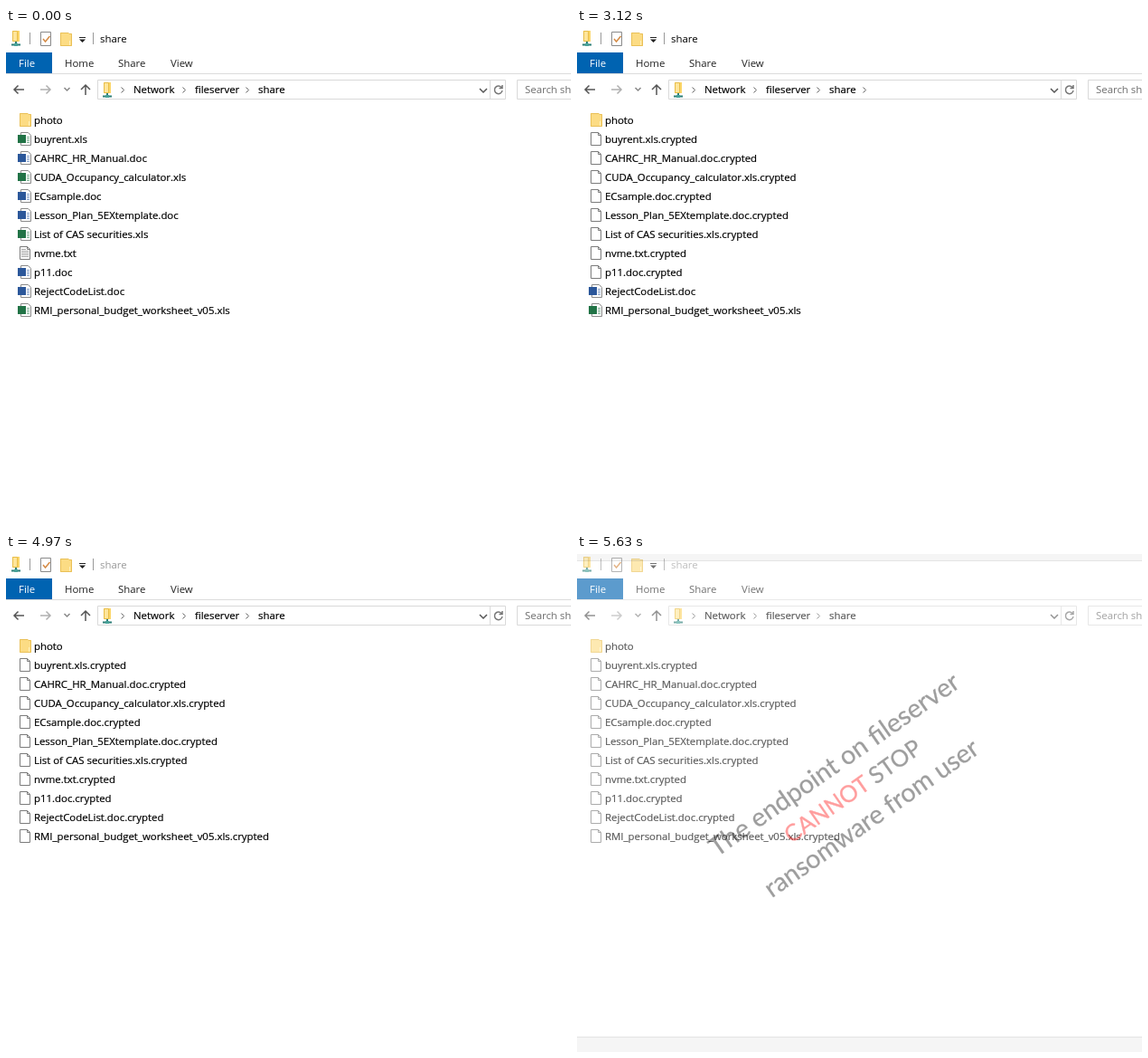
An HTML page for the animation above (8000 ms loop, 625 by 550 pixels).

```html
<!DOCTYPE html>
<html lang="en">
<head>
<meta charset="utf-8">
<title>Shared folder</title>
<style>
  html, body { margin: 0; width: 100%; height: 100%; overflow: hidden; background: #fff; }
  svg { display: block; }
  text { font: 11.4px "Open Sans", "Noto Sans", sans-serif; white-space: pre; }
  #files text, .dark { stroke: #000; stroke-width: .2; }
  .message text { font: 28.6px Lato, sans-serif; text-anchor: middle; stroke-width: .3; fill: #000; stroke: #000; }
  .message .caps { font-size: 25.6px; }
  .message .red { fill: #f00; stroke: #f00; }
  .line { fill: none; stroke: #666; }
</style>
</head>
<body>
<svg width="625" height="550" viewBox="0 0 625 550">
  <defs>
    <g id="folder">
      <path d="M0 0h9l1 1h3v14H0z" fill="#fcdc84"/>
      <path d="M.5 .5h8.500l1 1h2.500v13h-12z" fill="none" stroke="#e9c058"/>
      <path d="M10.500 9v5" stroke="#fff0bd"/>
    </g>
    <g id="share">
      <path d="M1 0h8v12H1z" fill="#fbd669"/>
      <path d="M1.500 .5h5v11h-5z" fill="#ffe59a" stroke="#e8bd48"/>
      <path d="M5 12v3M0 15.500h10" stroke="#2d7f78" stroke-width="2"/>
      <path d="M3 14h4v3H3z" fill="#49a399"/>
    </g>
    <g id="page">
      <path d="M.5 .5h8l3 3v11H.5z" fill="#fff" stroke="#7c7c7c"/>
      <path d="M8.500 .5v3h3" fill="none" stroke="#7c7c7c"/>
    </g>
    <g id="txt">
      <use href="#page"/>
      <path d="M2 3.500h5M2 5.500h8M2 7.500h8M2 9.500h8M2 11.500h8" stroke="#a5a5a5"/>
    </g>
    <g id="doc" fill="#2b579a" stroke="#7f9cc8"><use href="#sheet"/><path d="M-2 3h9v9h-9z" stroke="none"/></g>
    <g id="xls" fill="#217346" stroke="#79ad90"><use href="#sheet"/><path d="M-2 3h9v9h-9z" stroke="none"/></g>
    <g id="sheet">
      <path d="M1.500 .5h8l3 3v11h-11z" fill="#fff" stroke="#8a8a8a"/>
      <path d="M8 5.500h3M8 7.500h3M8 9.500h3M8 11.500h3"/>
    </g>
    <path id="chevron" class="line" d="M.5 .5l3 3-3 3"/>
  </defs>

  <use href="#share" x="6" y="3"/>
  <path d="M26.500 5v13M96.500 5v13" stroke="#999"/>
  <path d="M38.500 4.500h11v15h-11z" fill="#fff" stroke="#8a8a8a"/>
  <path d="M41 12l2.500 3 5-6" fill="none" stroke="#d58b45" stroke-width="1.500"/>
  <use href="#folder" x="60" y="5"/>
  <path d="M81 10h7v1h-7zM81 12.500h7l-3.500 3.500z" fill="#222"/>
  <text id="title" x="104" y="16">share</text>

  <path d="M0 50.500h625" stroke="#dcdcdc"/>
  <path d="M0 27h51v23H0z" fill="#0063b1"/>
  <text x="14" y="43" fill="#fff">File</text>
  <g fill="#222">
    <text x="65" y="43">Home</text>
    <text x="124" y="43">Share</text>
    <text x="182" y="43">View</text>
  </g>

  <g fill="none" stroke="#555" stroke-width="1.500">
    <path d="M20 68H9M13.500 63.500L9 68l4.500 4.500"/>
    <path d="M38 68h11M44.500 63.500L49 68l-4.500 4.500" stroke="#b0b0b0"/>
    <path d="M64.500 66l3 3 3-3" stroke="#888"/>
    <path d="M88 74V63M83 68l5-5 5 5"/>
    <path d="M524 67l4 4 4-4"/>
    <path d="M548 65.500a4.300 4.300 0 1 0 1 3.500M549 63v3.500h-3.500" stroke="#777"/>
  </g>
  <path d="M101.500 57.500h451v21h-451zM535.500 58v20M626 57.500h-60.500v21H626" fill="none" stroke="#d9d9d9"/>
  <use href="#share" x="107" y="60"/>
  <use href="#chevron" x="127" y="65"/>
  <use href="#chevron" x="195" y="65"/>
  <use href="#chevron" x="265" y="65"/>
  <use href="#chevron" x="316" y="65" id="lastChevron"/>
  <g class="dark">
    <text x="141" y="72">Network</text>
    <text x="209" y="72">fileserver</text>
    <text x="279" y="72">share</text>
  </g>
  <text x="574" y="72" fill="#6d6d6d">Search share</text>

  <use href="#folder" x="15" y="94"/>
  <text class="dark" x="31" y="106">photo</text>
  <g id="files"></g>

  <g id="overlay">
    <path d="M0 0h625v550H0z" fill="#fff" opacity=".36"/>
    <path d="M0 0h625v7H0zM0 534h625v16H0z" opacity=".04"/>
    <path d="M0 7.500h625M0 533.500h625" stroke="#000" opacity=".1"/>
    <g class="message" opacity=".38" transform="translate(290 240.500) rotate(-34.900)">
      <text>The endpoint on fileserver</text>
      <text class="caps" y="35"><tspan class="red">CANNOT</tspan> STOP</text>
      <text y="72">ransomware from user</text>
    </g>
  </g>
  <path id="cursor" d="M586.500 439.500v16l3.700-3.500 2.600 6 2.200-1-2.600-5.700h5.200z" fill="#fff" stroke="#000"/>
</svg>
<script>
const LOOP = 8000;
const names = [
  "buyrent.xls", "CAHRC_HR_Manual.doc", "CUDA_Occupancy_calculator.xls", "ECsample.doc",
  "Lesson_Plan_5EXtemplate.doc", "List of CAS securities.xls", "nvme.txt", "p11.doc",
  "RejectCodeList.doc", "RMI_personal_budget_worksheet_v05.xls"
];
const batchTimes = [2650, 3120, 3650]; // four files are encrypted per batch
const byId = id => document.getElementById(id);

function add(tag, attributes) {
  const node = document.createElementNS("http://www.w3.org/2000/svg", tag);
  for (const key in attributes) node.setAttribute(key, attributes[key]);
  return byId("files").appendChild(node);
}

const files = names.map((name, i) => {
  const y = 115 + 21 * i;
  return {
    name,
    type: name.slice(-3),
    time: batchTimes[Math.floor(i / 4)],
    icon: add("use", { x: 15, y }),
    label: add("text", { x: 31, y: y + 12 })
  };
});

const show = (id, visible) => byId(id).setAttribute("visibility", visible ? "visible" : "hidden");

function draw() {
  const t = performance.now() % LOOP;
  for (const file of files) {
    const crypted = t >= file.time;
    file.icon.setAttribute("href", "#" + (crypted ? "page" : file.type));
    file.label.textContent = file.name + (crypted ? ".crypted" : "");
  }
  byId("title").setAttribute("fill", t < 4970 ? "#000" : "#999");
  show("lastChevron", t >= 1260 && t < 4970);
  show("overlay", t >= 5170);
  show("cursor", t >= 5570 && t < 5630);
  requestAnimationFrame(draw);
}
draw();
</script>
</body>
</html>
```
